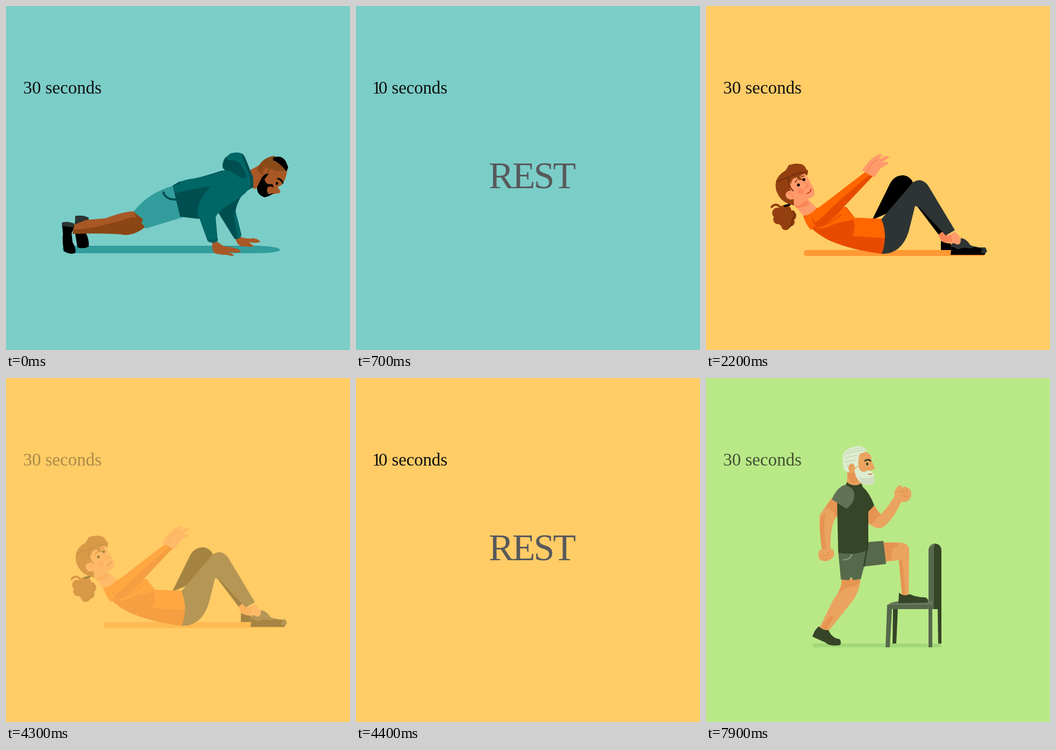
Write an HTML page with a canvas that moves like this. It is 640 by 640 pixels and loops after 8 s.

```html
<!DOCTYPE html>
<html lang="en">
<head>
<meta charset="utf-8">
<title>Workout</title>
<style>
html, body { margin: 0; width: 100%; height: 100%; overflow: hidden; }
canvas { display: block; width: 640px; height: 640px; }
</style>
</head>
<body>
<canvas id="stage" width="640" height="640"></canvas>
<script>
const canvas = document.getElementById('stage');
const ctx = canvas.getContext('2d');
const SERIF = '"Liberation Serif", "Times New Roman", serif';
const BLACK = '#000', COAL = '#2d3433';

function fill(color, d) {
  ctx.fillStyle = color;
  ctx.fill(new Path2D(d));
}

function line(color, width, d) {
  ctx.strokeStyle = color;
  ctx.lineWidth = width;
  ctx.lineCap = ctx.lineJoin = 'round';
  ctx.stroke(new Path2D(d));
}

function dot(color, x, y, rx, ry = rx, turn = 0) {
  ctx.fillStyle = color;
  ctx.beginPath();
  ctx.ellipse(x, y, rx, ry, turn, 0, Math.PI * 2);
  ctx.fill();
}

function text(str, x, y, size, color, spacing = 0) {
  ctx.font = `${size}px ${SERIF}`;
  ctx.letterSpacing = spacing + 'px';
  ctx.fillStyle = color;
  ctx.fillText(str, x, y);
}

function work() {
  text('30 seconds', 32, 163, 33, '#111');
}

function rest() {
  text('1', 30, 163, 33, '#111');
  text('0 seconds', 42, 163, 33, '#111', -0.15);
  text('REST', 247, 338.5, 70, '#58595b', -3);
}

function pushUp() {
  const skin = '#a85825', shade = '#8a4614', deep = '#004f50', teal = '#006666', light = '#339d9d';
  work();
  fill(light, 'M114 446H462C492 446 510 450 510 453.5S492 460 462 460H128C110 460 105 457 105 453S108 446 114 446Z');

  // legs
  fill(BLACK, 'M129 391Q142 388 153 394L154 403L148 421Q155 434 154 447Q146 453 133 449L128 420Z');
  fill(COAL, 'M130 391Q142 388 154 394L152 401L128 406Z');
  fill(skin, 'M149 398L185 395Q222 381 241 382L246 397L205 406L125 412L122 409Z');
  fill(shade, 'M125 411L178 400Q215 390 240 393L259 411Q241 426 221 426Q195 422 124 424Z');
  fill(skin, 'M124 411L178 399Q212 389 240 383L238 392Q205 402 180 408Q150 415 123 416Z');
  fill(BLACK, 'M104 404Q113 400 127 405L126 413L122 423L124 440Q131 451 129 459Q120 464 108 456Q104 440 106 424Z');
  fill(COAL, 'M104 403Q113 399 127 405L125 412L105 409Z');

  // shorts
  fill(light, 'M238 382Q265 347 312 334L329 393L260 414Z');
  fill(shade, 'M239 384L255 397L252 403L258 411L245 402Z');

  // far arm
  fill(skin, 'M427 432L437 430Q449 434 460 432Q472 434 473 439Q463 442 452 439L461 447Q455 449 444 447Q430 449 427 432Z');
  fill(deep, 'M452 335Q430 360 427 382L438 426Q434 436 425 433Q405 401 394 383L410 350Z');
  fill(teal, 'M427 382L438 426Q436 433 431 432L424 390Z');

  // torso
  fill(deep, 'M310 334L322 327Q365 319 402 306L450 312L455 340L400 373L358 396L324 392Z');
  fill(teal, 'M310 334L321 332Q326 323 350 321Q385 315 408 305L435 314L390 334Q350 340 315 348Z');
  line(deep, 4, 'M293 347Q297 360 315 360');

  // near arm
  fill(skin, 'M384 440L394 439Q405 449 416 448Q435 452 437 457Q430 461 413 457L424 463Q423 467 412 463Q393 463 387 459Q382 450 384 440Z');
  fill(teal, 'M432 309Q395 317 370 348Q353 371 358 390L375 437Q384 444 394 438L390 393Q394 383 412 371Q447 352 456 334Z');
  line(deep, 2, 'M375 434Q384 440 393 434');

  // neck and hood
  fill(skin, 'M453 306L473 295L492 312L471 336L461 341Z');
  fill(teal, 'M403 301Q402 286 418 274Q434 270 441 276Q453 302 460 320L460 338L451 340Q446 316 424 307L407 305Z');
  fill(deep, 'M403 300Q402 287 411 279Q407 289 422 287Q440 289 448 320L435 319Q425 308 408 306Z');
  fill(deep, 'M438 274Q443 276 447 287L460 320V337L454 340Q458 322 448 302Z');

  // head
  fill(skin, 'M468 303Q477 282 500 280L523 304Q522 322 513 333L505 337Q513 345 509 348L497 350L476 348L467 335Z');
  fill('#8a4b1a', 'M466 304Q478 280 500 279L520 307L508 307Q500 308 494 302L484 314L472 309Z');
  fill(BLACK, 'M497 282Q514 276 521 290L525 300L522 308Q509 291 497 287Z');
  dot(shade, 480, 304, 8, 10, .4);
  dot(skin, 482, 305, 5.5, 8, .4);
  line(shade, 2, 'M478 308Q479 299 486 299');
  fill(BLACK, 'M489 312Q478 311 473 325L467 337Q466 351 481 356Q493 353 498 348L489 350Q483 344 487 337Q494 334 496 338Q499 335 495 331Q483 334 481 322Z');
  line(skin, 2, 'M487 345L493 348');
  line(BLACK, 3, 'M506 321Q513 323 515 329');
  dot(BLACK, 504, 330, 2.2, 2.8);
}

function sitUp() {
  const skin = '#ff9b6b', blush = '#f98555', hair = '#943f10', dark = '#6c2b0a', bright = '#ff6600', rust = '#e84b00';
  work();
  fill('#ff9933', 'M187 454H517V465H187Q182 465 182 459.5T187 454Z');

  // far leg
  fill(BLACK, 'M309 398L343 329Q352 314 368 315Q380 317 385 328L350 380Z');
  fill(BLACK, 'M390 369L401 360L443 416L434 427Z');
  fill(blush, 'M432 426L443 417L458 437L441 443Z');
  fill(BLACK, 'M437 437Q447 443 457 441V454H437Z');

  // near leg
  fill(skin, 'M449 428L463 420L476 433L469 447L456 445Z');
  fill(blush, 'M449 428L456 425L458 444Z');
  fill(COAL, 'M326 397L379 335Q386 324 398 324Q409 326 415 337L463 417L446 427L397 375L389 372L377 420Q363 463 325 461Z');
  fill(COAL, 'M456 445Q459 438 467 444Q475 444 474 432Q484 432 492 445Q504 450 519 449Q526 456 519 461L456 463Z');
  fill(BLACK, 'M455 463L457 448Q464 449 469 453Q477 449 485 450Q495 452 500 448L514 452L511 459L519 461V463Z');

  // shirt
  fill(rust, 'M181 391Q190 379 206 376L261 374L277 394L326 396Q339 430 327 461Q270 454 229 436Q189 415 181 391Z');
  fill(bright, 'M258 374L277 394L326 396Q333 411 333 432L272 428Q280 410 274 397L240 405Q215 419 200 411Z');
  fill(bright, 'M181 391Q187 381 207 376L225 385L200 411L195 417Q185 405 181 391Z');

  // arm
  fill(rust, 'M198 388L296 310L310 317L257 373Q225 411 207 411Q194 402 198 388Z');
  fill(bright, 'M194 388Q197 379 211 374L296 309L304 314L238 371Q216 395 203 403Z');
  line(rust, 2, 'M202 411Q218 414 252 388');
  fill(skin, 'M290 306L301 291Q312 280 322 276Q329 274 327 279L316 288L332 280Q340 277 341 282L327 291L338 290Q342 293 335 296L325 302L313 319L307 315Z');
  line(blush, 2, 'M299 309L310 292L322 283');

  // neck and hair
  fill(skin, 'M163 369L188 358L206 376Q194 390 181 390Z');
  fill(blush, 'M165 371L188 362L193 369Q178 376 168 376Z');
  fill(hair, 'M164 371Q139 367 131 344Q124 320 148 306L154 296Q165 292 175 294Q185 294 189 311L163 319Z');
  for (const [x, y, r] of [[133, 385, 10], [147, 382, 12], [158, 390, 10], [134, 397, 9], [146, 399, 12], [157, 402, 8], [148, 409, 8]])
    dot(hair, x, y, r);
  line(hair, 4, 'M141 377Q130 364 122 374');
  line(dark, 2, 'M162 381Q168 390 160 397Q162 408 153 413');
  line(BLACK, 4, 'M147 372L155 370');

  // face
  fill(skin, 'M156 318Q168 306 182 311L189 319L199 337Q205 349 199 355Q184 361 174 371L164 371Q164 356 156 339Z');
  fill(hair, 'M153 316Q165 304 189 311Q180 311 174 318L180 323Q171 326 169 319Q159 319 158 333Z');
  line(dark, 2, 'M132 327Q143 321 153 319Q169 310 186 309');
  line(dark, 2, 'M153 320Q154 337 162 344');
  line(hair, 4, 'M177 306L188 307L187 313');
  dot(skin, 157, 352, 9, 8, .4);
  line(blush, 2, 'M152 349Q160 347 162 356');
  dot('#ff875f', 176, 345, 6);
  dot(BLACK, 172, 333, 2.7);
  dot(BLACK, 182, 323, 2.7);
  line(hair, 2, 'M166 328L169 324M177 318L182 316');
  line(blush, 2, 'M184 328L190 335L184 338');
  line('#d43d25', 2, 'M188 349Q196 346 195 341');
}

function stepUp() {
  const skin = '#ff8750', shade = '#f9713d', white = '#eee', grey = '#ccc';
  work();
  fill('#98d073', 'M202 494H438V501H202Q198 501 198 497.5T202 494Z');

  // chair
  fill(BLACK, 'M348 428H357L354 494H347ZM431 428H438V494H432Z');
  fill(BLACK, 'M414 319Q417 308 426 308Q438 309 438 322V430H414Z');
  fill(COAL, 'M414 430V320Q416 309 427 308Q423 312 424 323V430Z');
  fill('#454b4a', 'M416 314Q419 308 427 308Q423 310 422 314Z');
  fill('#454b4a', 'M337 423Q344 416 360 415H421V424Z');
  fill(COAL, 'M337 422H421V501H414V430H346L342 501H334Z');

  // far arm
  fill(skin, 'M302 245L313 237L325 254Q341 237 352 218L363 231Q351 258 336 272Q324 285 309 275L302 271Z');
  fill(shade, 'M302 247L312 238L325 254L316 263Q310 273 302 271Z');
  fill(skin, 'M350 214Q354 201 361 199Q368 203 363 208Q369 198 374 204Q382 206 382 216Q381 230 367 231L354 229Z');
  line(shade, 2, 'M357 212Q366 210 369 217M363 208L368 211M373 205L375 212M364 219L375 221');

  // legs
  fill(skin, 'M252 373H287Q288 391 274 413L228 471L211 465L237 412Q253 392 252 373Z');
  fill(shade, 'M253 375H286Q285 384 277 387Q259 388 247 401Q253 389 253 375ZM232 442L238 445L223 469L212 465Z');
  fill(BLACK, 'M210 462Q217 470 228 469Q234 484 249 486Q253 493 249 497Q230 500 222 492Q210 487 198 481Q202 468 210 462Z');
  fill(skin, 'M330 306H359Q377 306 378 320L377 407L365 408L359 339L333 342Z');
  fill(shade, 'M331 306H356Q362 313 347 317L344 338L333 342ZM359 340L365 337L371 405L365 408Z');
  fill(BLACK, 'M358 419L359 399Q367 408 379 402Q391 408 408 408Q416 412 412 418Z');

  // shorts
  fill(COAL, 'M292 306L330 303L335 346L292 351Z');
  fill(COAL, 'M246 324L302 309L294 351L288 374L274 376L270 370L266 376L251 375Z');
  line(BLACK, 3, 'M301 309L294 350');
  line('#656b6a', 3, 'M256 338Q268 338 271 329');

  // near arm and shirt
  fill(skin, 'M233 224L258 240L241 261Q230 278 232 322L216 323Q209 270 212 254Z');
  fill(shade, 'M231 227L258 239L242 259Q232 240 222 243ZM215 258L223 251Q216 284 225 320L216 322Q209 277 215 258Z');
  fill(skin, 'M211 320Q225 314 237 320Q241 328 236 334Q227 344 213 339Q206 332 211 320Z');
  line(shade, 2, 'M213 330H226M228 323V332M217 334V339M223 334V340');
  fill(skin, 'M263 173H290V201L276 208L262 198Z');
  fill(BLACK, 'M245 208L260 199L262 194Q276 204 289 196L292 203Q304 213 313 237L302 249V320Q275 331 246 325L244 238Z');
  fill('#3c4141', 'M234 226Q242 206 257 199Q276 203 276 218Q275 235 261 243Z');

  // head
  fill(skin, 'M275 146L296 137Q308 140 308 154L315 169L306 172L304 188L276 181Z');
  fill(shade, 'M264 175L276 169L285 193L273 197Q264 192 264 175Z');
  fill(white, 'M257 171Q251 147 257 139Q267 126 288 127Q299 130 298 137L286 141Q282 154 284 163L277 167L265 176Z');
  line(grey, 1.5, 'M257 143Q276 136 296 134M262 138Q276 131 292 130M259 149Q269 145 280 144M258 157Q267 153 278 153M261 165L265 161');
  dot(skin, 271, 168, 6, 9);
  line(shade, 2, 'M269 170Q267 162 274 163');
  fill(white, 'M276 171L283 164Q288 178 297 174L302 172L311 181Q316 191 311 198Q298 201 288 195Q278 187 276 171Z');
  fill('#d8d8d8', 'M285 183Q293 190 312 183Q315 192 311 198Q298 200 288 195Z');
  fill(white, 'M294 178Q297 170 307 173L314 182L302 183Z');
  line('#cf4b24', 2, 'M303 179L308 179');
  line(BLACK, 3, 'M296 154Q301 150 306 154');
  dot(BLACK, 300, 160, 2.1, 2.7);
}

// start time, background, picture, opacity
const TEAL = '#7bcdc8', YELLOW = '#ffcc66', GREEN = '#b9e986';
const cues = [
  [0, TEAL, pushUp, 1], [500, TEAL, pushUp, .7], [600, TEAL, pushUp, .35], [700, TEAL, rest, 1],
  [2200, YELLOW, sitUp, 1], [4200, YELLOW, sitUp, .7], [4300, YELLOW, sitUp, .35], [4400, YELLOW, rest, 1],
  [5900, GREEN, stepUp, 1], [7900, GREEN, stepUp, .7]
];
const LOOP = 8000;
const start = performance.now();
let shown;

function frame() {
  const t = (performance.now() - start) % LOOP;
  const cue = cues.findLast(c => c[0] <= t);
  if (cue !== shown) {
    const [, color, draw, alpha] = shown = cue;
    document.body.style.background = color;
    canvas.style.opacity = alpha;
    ctx.clearRect(0, 0, 640, 640);
    draw();
  }
  requestAnimationFrame(frame);
}
frame();
</script>
</body>
</html>
```
